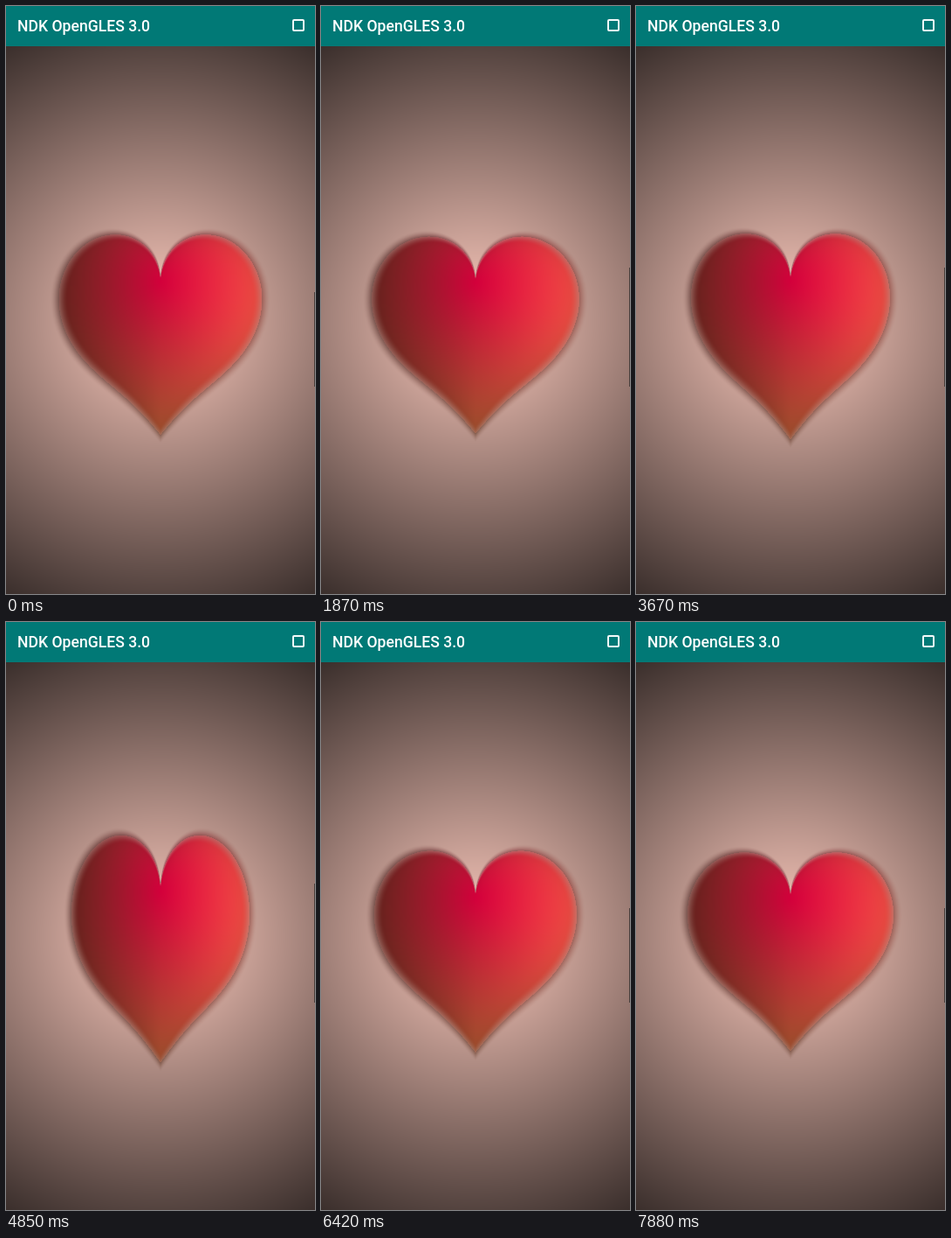
An HTML page with a canvas that plays this animation: 354x672 px, repeating every 7920 ms.

```html
<!DOCTYPE html>
<html lang="en">
<head>
<meta charset="utf-8">
<title>NDK OpenGLES 3.0</title>
<style>
  html, body { margin: 0; width: 100%; height: 100%; overflow: hidden; background: #017976; }
  h1 {
    position: absolute; left: 13px; top: 0; margin: 0;
    font: 500 17.6px/46px Roboto, sans-serif; color: #fff; white-space: nowrap;
  }
  i {
    position: absolute; left: 328px; top: 15px; width: 14px; height: 14px;
    box-sizing: border-box; border: 2px solid #f4fafa; border-radius: 2px;
  }
  canvas { position: absolute; left: 0; top: 46px; }
</style>
</head>
<body>
<h1>NDK OpenGLES 3.0</h1>
<i></i>
<canvas width="354" height="626"></canvas>
<script>
const W = 354, H = 626, UNIT = W / 2;
const LOOP = 7920, HOLD = 520, STEP = 78.5, LAST = 93;
const BEAT = 25.7, FIRST_BEAT = 2.27; // in steps

const ctx = document.querySelector('canvas').getContext('2d');
const image = ctx.createImageData(W, H);
const clamp = v => Math.min(1, Math.max(0, v));
const smooth = v => v * v * (3 - 2 * v);

function shade(px, py, phase, swing, out) {
  const glow = 255 * (1 - 0.38 * Math.hypot(px, py));
  out[0] = glow;
  out[1] = glow * 0.8;
  out[2] = glow * 0.75;

  // squash and stretch, with a phase lag along the height
  const squash = 1 + swing * Math.sin(phase + py * 0.5);
  const x = px * (0.5 + 0.5 * squash);
  const y = py * (1.5 - 0.5 * squash) - 0.25;
  const r = Math.hypot(x, y);
  if (r > 1.1) return;

  // heart outline in polar form
  const h = Math.abs(Math.atan2(x, y)) / Math.PI;
  const d = h * (13 - 22 * h + 10 * h * h) / (6 - 5 * h);
  const cover = smooth(clamp((d - r + 0.06) / 0.12));
  if (!cover) return;

  let light = 0.3 + 0.7 * (0.75 + 0.75 * x) * (1 - 0.25 * r);
  light *= 255 * (0.5 + 0.5 * Math.pow(1 - clamp(r / d), 0.1));
  const heart = [light, light * 0.5 * r, light * 0.28];
  for (let c = 0; c < 3; c++) out[c] += (heart[c] - out[c]) * cover;
}

function draw(step) {
  const t = ((step - FIRST_BEAT + BEAT) % BEAT) / BEAT;
  const swing = 0.25 * (1 + Math.pow(t, 0.2)) * Math.exp(-4 * t);
  const phase = t * Math.PI * 6;
  const rgb = [0, 0, 0];
  let i = 0;
  for (let y = 0; y < H; y++) {
    for (let x = 0; x < W; x++) {
      shade((x + 0.5) / UNIT - 1, (H / 2 - y - 0.5) / UNIT, phase, swing, rgb);
      image.data[i++] = rgb[0];
      image.data[i++] = rgb[1];
      image.data[i++] = rgb[2];
      image.data[i++] = 255;
    }
  }
  ctx.putImageData(image, 0, 0);

  // thin scroll mark on the right edge
  const top = step >= 0 && step < 60 ? 253 : 281;
  ctx.fillStyle = '#4a403d';
  ctx.fillRect(W - 1, top, 1, 389 - top);
}

let shown = null;
function frame(now) {
  const t = now % LOOP;
  const step = t < HOLD ? -6.6 : Math.min(LAST, Math.floor((t - HOLD) / STEP));
  if (step !== shown) draw(shown = step);
  requestAnimationFrame(frame);
}
frame(0);
</script>
</body>
</html>
```
